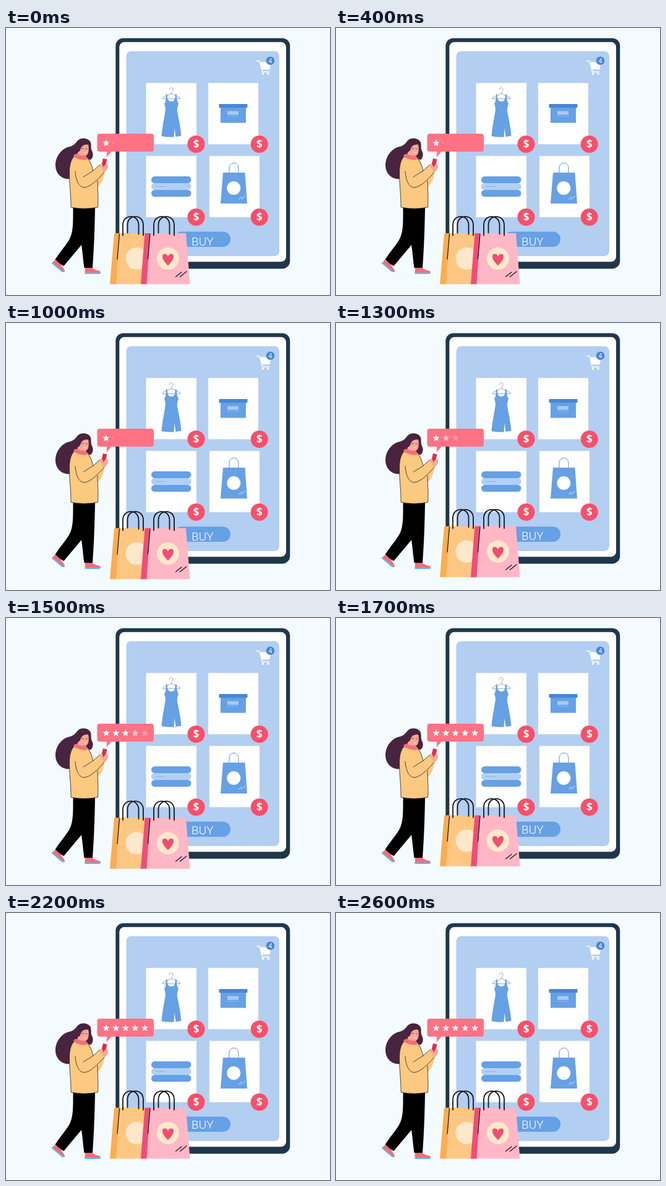
An HTML page for the animation above (3.6 s loop, 524 by 432 pixels).

```html
<!DOCTYPE html>
<html lang="en">
<head>
<meta charset="utf-8">
<title>Online shopping</title>
<style>
html, body { margin: 0; width: 100%; height: 100%; overflow: hidden; background: #f4fbff; }
svg { display: block; width: 100vw; height: 100vh; }
text { text-anchor: middle; fill: #fff; }
.line { fill: none; stroke: #17161c; stroke-linecap: round; stroke-linejoin: round; }
</style>
</head>
<body>
<svg viewBox="0 0 524 432">
  <defs>
    <path id="star" fill="#fff"/>
    <g id="price">
      <circle r="14" fill="#f94f69"/>
      <text y="5.8" font-family="Open Sans, sans-serif" font-size="17" font-weight="700">$</text>
    </g>
    <g id="handles" class="line" stroke-width="1.8">
      <path d="M0 31V14C0 -4 25.500 -4 25.500 14V29"/>
      <path d="M7.500 27V14C7.500 -4 33 -4 33 14V31"/>
    </g>
  </defs>

  <!-- tablet -->
  <rect x="177.300" y="16.400" width="282" height="373" rx="12.500" fill="#20364a"/>
  <rect x="183.300" y="22.800" width="269.700" height="355.400" rx="8" fill="#fff"/>
  <rect x="194.500" y="37.500" width="247.500" height="331.500" rx="8" fill="#b2cef1"/>

  <!-- cart -->
  <g fill="none" stroke="#fff" stroke-width="1.3" stroke-linecap="round" stroke-linejoin="round">
    <path d="M405 53.5H410L414.500 71H426"/>
    <path d="M411 56H428L426 66.500H413.500Z" fill="#fff"/>
  </g>
  <circle cx="415.500" cy="74" r="1.8" fill="#fff"/>
  <circle cx="424" cy="74" r="1.8" fill="#fff"/>
  <circle cx="427.500" cy="53" r="6.8" fill="#4686d2"/>
  <text x="427.500" y="56.800" font-family="Open Sans, sans-serif" font-size="10.500">4</text>

  <!-- product cards -->
  <g fill="#fff" stroke="#dfe8f2" stroke-width=".6">
    <rect x="226.500" y="89" width="81.500" height="99"/>
    <rect x="327" y="89" width="81" height="99"/>
    <rect x="226.500" y="207" width="81.500" height="99"/>
    <rect x="329" y="207" width="81" height="99"/>
  </g>

  <!-- dress -->
  <path d="M264.500 100C264 95.500 270.500 95.500 270 100C269.500 102.500 267.500 102 267.500 106L253.500 112.500V114.500H281.500V112.500L267.500 106" fill="none" stroke="#7396c0" stroke-width=".8"/>
  <path d="M258.500 107.500H261C260.500 114 262 119 267.500 119C273 119 274 114 273.500 107.500H276C276 114 276.500 119 279 122.500C277.500 127 276.500 131 277 135C279.500 148 282.500 161 283.500 174.500L274.500 176L272.500 162L271.500 176.500Q260 177 251.500 175C252.500 161 255.500 148 257.500 135C258.500 131 257.500 127 256 122.500C258.500 119 259 114 258.500 107.500Z" fill="#66a0e5"/>

  <!-- box -->
  <rect x="347" y="128" width="41" height="25.500" fill="#66a0e5"/>
  <rect x="344.500" y="123" width="46" height="6" rx=".8" fill="#4787d4"/>
  <rect x="358" y="134.500" width="18" height="6" fill="#a9caf2"/>
  <path d="M358 143H376" stroke="#8fb9ee"/>

  <!-- towels -->
  <rect x="235" y="251" width="64.500" height="11" rx="5" fill="#b2d0f4"/>
  <rect x="235" y="240" width="64.500" height="11" rx="5.500" fill="#66a0e5"/>
  <rect x="235" y="262" width="64.500" height="11" rx="5.500" fill="#66a0e5"/>
  <path d="M241 256.500H258" stroke="#85b2e8" stroke-width=".9"/>

  <!-- bag on the fourth card -->
  <path d="M361 238V227C361 215.500 376 215.500 376 227V238" fill="none" stroke="#5b8dca" stroke-width="1"/>
  <path d="M351 234H386.500L390 284H347Z" fill="#66a0e5"/>
  <circle cx="368.300" cy="259" r="11" fill="#fff"/>
  <path d="M376 277.500L381 273M380 277.500L387 271.500" stroke="#e6f1ff" stroke-width=".9"/>

  <use href="#price" x="307.500" y="188"/>
  <use href="#price" x="409.800" y="188"/>
  <use href="#price" x="307.500" y="306"/>
  <use href="#price" x="409.800" y="306"/>

  <!-- buy button -->
  <rect x="272" y="329.500" width="91" height="24.500" rx="12" fill="#66a0e5"/>
  <text id="buy" x="317.800" y="348.500" font-family="Roboto, sans-serif" font-size="19" font-weight="300">BUY</text>

  <!-- woman -->
  <path d="M116 182C122 176 133 178 136.500 184C139 190 136 194 139.500 200C142 205 140 211 137 213L112 214C114 224 110 234 104 244C91 246 80 236 80 222C80 207 91 194 103 192C110 190 112 187 116 182Z" fill="#482440"/>
  <path d="M117 190C120 185 129 184 133 188C134 193 134 198 133 202C131.500 207 127 208 124 206.500L123 211H114L116 201Z" fill="#f7a796"/>
  <path d="M114 203C112 194 115 184 124 182C130 181 134 185 134 189C127 187 121 191 120 198Z" fill="#482440"/>
  <path class="line" d="M122 194.500Q123.500 196 125.500 195M129 195.500Q130.500 196.500 131.500 195.500" stroke-width=".6"/>
  <path d="M125 201.500Q128 203.500 130.500 201.500Z" fill="#fff"/>

  <path d="M108.500 291C108.500 315 109 331 102 343C95 354 87 363 79.500 374.500Q86 382 93.500 385L122 351C124 363 124.500 376 126.500 388H140C142.500 355 143.500 320 144 291Z" fill="#000"/>
  <path d="M80 375L77 377L75 380L92 395L95.500 393L88 382Z" fill="#f66b79"/>
  <path d="M75 379L73.500 380.500L90 394.500Q94 396.500 95.500 393Q92.500 394 89.500 391Z" fill="#5eb9e8"/>
  <path d="M128 388H139.500Q144 392 151.500 393Q153.500 395 153 396.500H127.500Z" fill="#f66b79"/>
  <path d="M127.500 395.500H153Q153 398 150 398H127.500Z" fill="#5eb9e8"/>

  <path d="M109 209C104 215 102.500 224 102.500 236C102.500 255 105.500 273 105 290Q126 294.500 148.500 290C149.500 276 148.500 266 148 257C154 253 158 244 159.500 233L152 221L141 231C139 221 136 212 130 209Z" fill="#fbc980"/>
  <path d="M109 208Q110 203 115 204Q122 208 129 206.500Q133 211 130 213.500Q119 214 109 208Z" fill="#f36f78"/>
  <g class="line" stroke-width=".75">
    <path d="M109 209C104 215 102.500 224 102.500 236C102.500 255 105.500 273 105 290Q126 294.500 148.500 290C149.500 276 148.500 266 148 247"/>
    <path d="M132 211Q138 218 141 231L152 221"/>
    <path d="M112 232C113 247 118 258 127 258C137 257 150 244 159 233"/>
    <path d="M125 241L141 231"/>
  </g>
  <path d="M157 211L163.500 212.500L160 227L153.500 225.500Z" fill="#d92f4b"/>
  <path d="M152 223Q153.500 218 155.500 220L157.500 225L162 219.500Q165.500 220 165 226Q162.500 232 158.500 233.500Z" fill="#f7a796"/>

  <!-- review bubble -->
  <path d="M163.500 198H172.500L162.500 209Z" fill="#ff7284"/>
  <rect x="147.500" y="171" width="91.500" height="29" rx="4" fill="#ff7284"/>
  <circle id="dot" cx="172.500" cy="186" r=".7" fill="#fff"/>
  <g id="stars"></g>

  <!-- shopping bags -->
  <g id="bags">
    <path d="M175 315H184.500L179 397.500H168Z" fill="#fdac50"/>
    <path d="M184 315H228L222 397.500H178Z" fill="#fdc783"/>
    <circle cx="211.500" cy="356" r="18" fill="#fde8cb"/>
    <path d="M224.500 315H233.500L228 397.500H218Z" fill="#f04d77"/>
    <path d="M233 315H291L297.500 397.500H227.500Z" fill="#ffb7c5"/>
    <circle cx="262" cy="356" r="18" fill="#fde8cb"/>
    <path d="M262 367.500C257 362 252.500 357.500 253 352C253.500 347 260 347.500 262 352.500C264 347.500 270.500 347 271 352C271.500 357.500 267 362 262 367.500Z" fill="#f04d73"/>
    <use href="#handles" x="189" y="287.600"/>
    <use href="#handles" x="239" y="287.600"/>
    <path class="line" d="M183.500 316L180 357M233 316L229.500 357M274.500 385.500L284 378M281.500 385.500L292 377" stroke-width="1.200"/>
  </g>
</svg>
<script>
const LOOP = 3600, STEP = 100, LAST = 2600;
const get = id => document.getElementById(id);
const clamp = v => Math.min(1, Math.max(0, v));
const progress = (t, from, to) => clamp((t - from) / (to - from));
const easeOut = p => 1 - (1 - p) ** 2;
const shiftDown = (id, y) => get(id).setAttribute("transform", `translate(0 ${y})`);

function starPath(r) {
  const points = Array.from({ length: 10 }, (_, i) => {
    const a = i * Math.PI / 5, d = i % 2 ? r * 0.46 : r;
    return `${d * Math.sin(a)} ${-d * Math.cos(a)}`;
  });
  return `M${points.join("L")}Z`;
}
get("star").setAttribute("d", starPath(5.7));

const stars = Array.from({ length: 5 }, (_, i) => {
  const star = document.createElementNS("http://www.w3.org/2000/svg", "use");
  star.setAttribute("href", "#star");
  star.setAttribute("x", 162 + i * 15.65);
  star.setAttribute("y", 186.3);
  get("stars").append(star);
  return star;
});

function draw(ms) {
  const t = Math.min(LAST, Math.floor(ms % LOOP / STEP) * STEP);
  const left = 1 - easeOut(progress(t, 1200, 2200));
  shiftDown("bags", 17 * left);
  shiftDown("buy", 3.5 * left);
  stars.forEach((star, i) => {
    const start = 1040 + i * 90;
    star.setAttribute("opacity", i ? progress(t, start, start + 280) : 1);
  });
  get("dot").setAttribute("opacity", t <= 1000 ? 0.8 : 0);
}

const begin = performance.now();
function tick() {
  draw(performance.now() - begin);
  requestAnimationFrame(tick);
}
tick();
</script>
</body>
</html>
```
